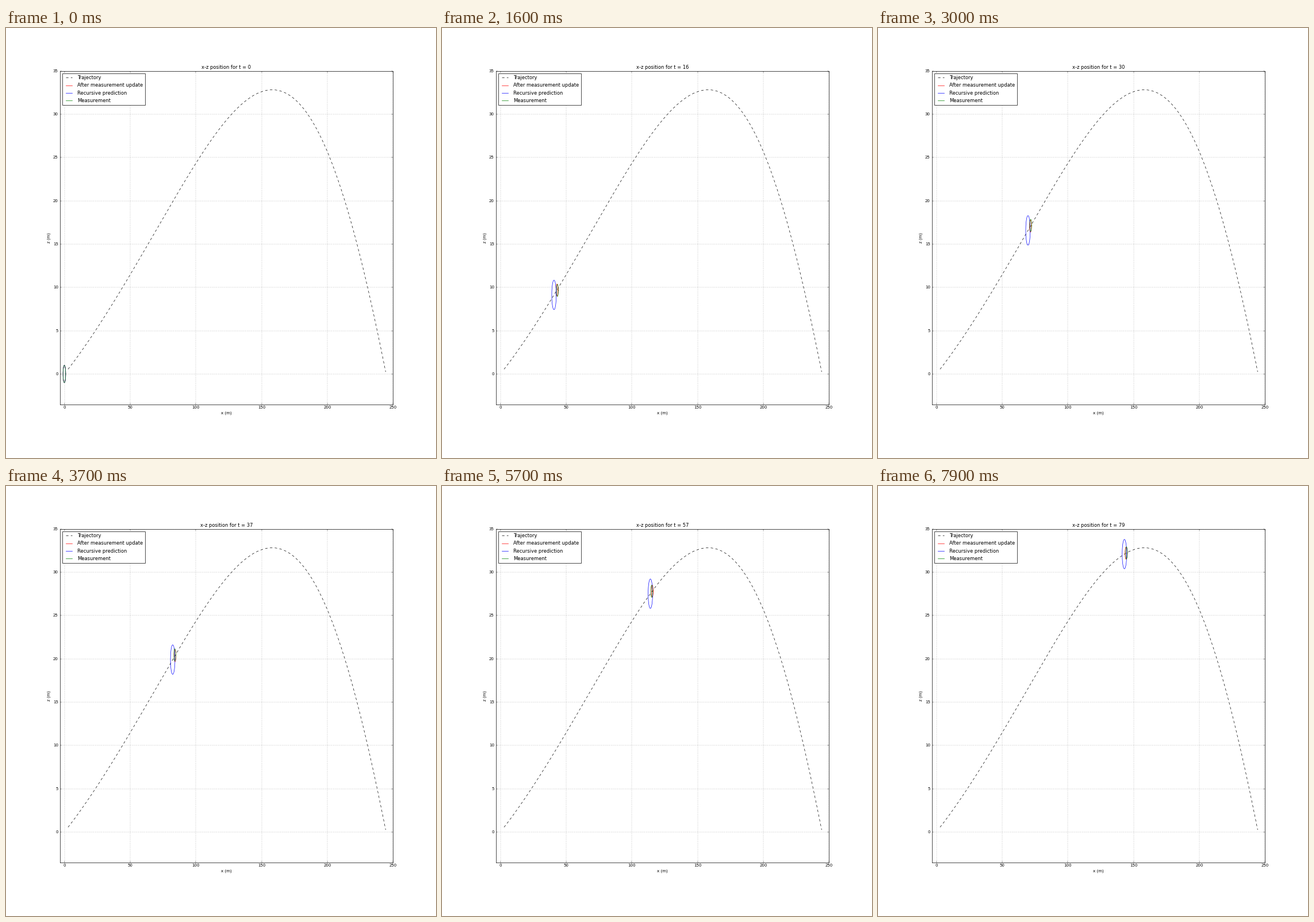
A matplotlib script that plays this animation: 748 by 748 pixels, repeating every 8000 ms.

```python
import matplotlib.pyplot as plt
import numpy as np
from matplotlib.animation import FuncAnimation

FRAMES, INTERVAL = 80, 100
SIZE, DPI = 748, 50

plt.style.use("classic")
plt.rcParams.update({
    "font.family": "DejaVu Sans",
    "font.size": 10,
    "figure.facecolor": "white",
    "savefig.facecolor": "white",
    "savefig.dpi": "figure",
})

# Key points of the flight path, joined by one polynomial.
KEY_X = [2.84, 24.14, 82.3, 125.05, 158, 200, 244.4]
KEY_Z = [0.55, 5.12, 19.88, 29.64, 32.83, 25.7, 0.25]
height = np.polynomial.Polynomial.fit(KEY_X, KEY_Z, len(KEY_X) - 1)

ANGLE = np.linspace(0, 2 * np.pi, 100)


def position(t):
    """Ball position at step t, slowed by drag."""
    if t <= 0:
        return 0.0, 0.0
    x = KEY_X[0] + 162.9 * np.log(1 + 0.0175 * t)
    return x, height(x)


def place(line, x, z, radius):
    line.set_data(x + radius * np.cos(ANGLE), z + radius * np.sin(ANGLE))


fig = plt.figure(figsize=(SIZE / DPI, SIZE / DPI), dpi=DPI)
ax = fig.add_axes([0.125, 0.125, 0.775, 0.775])
ax.set(xlim=(-3.5, 250), ylim=(-3.5, 35), xlabel="x (m)", ylabel="z (m)",
       xticks=range(0, 251, 50), yticks=range(0, 36, 5))
ax.grid(True)

path_x = np.linspace(KEY_X[0], KEY_X[-1], 300)
ax.plot(path_x, height(path_x), "k--", label="Trajectory")
updated, = ax.plot([], [], "r", label="After measurement update")
predicted, = ax.plot([], [], "b", label="Recursive prediction")
measured, = ax.plot([], [], "g", label="Measurement")
ax.legend(loc="upper left")
title = ax.set_title("")


def update(t):
    decay = 0.5 ** t
    x, z = position(t)
    # Measurement error wobbles around the true position.
    phase = np.radians(57.857 * (t - 9) - 70)
    error = 0.4 * (1 - decay)
    small = 0.7 + 0.3 * decay
    place(updated, x, z, small)
    place(predicted, *position(t - 1), 1.7 - 0.7 * decay)
    place(measured, x + error * np.cos(phase),
          z + 0.25 * error * np.sin(phase), small)
    title.set_text(f"x-z position for t = {t}")
    return updated, predicted, measured, title


anim = FuncAnimation(fig, update, frames=FRAMES, interval=INTERVAL,
                     init_func=lambda: update(0), repeat=True,
                     repeat_delay=0, blit=False)
plt.show()
```
